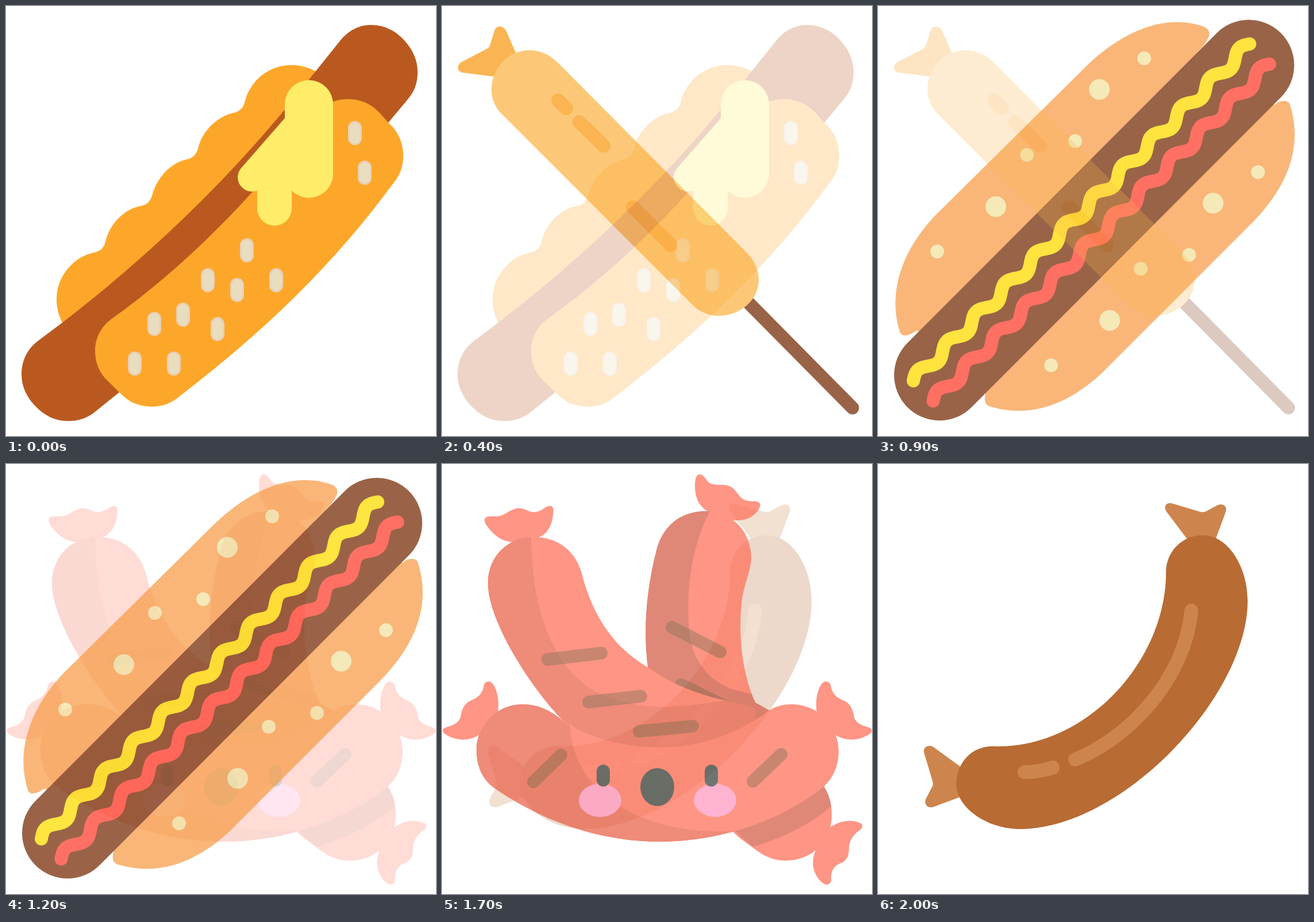
An HTML page for the animation above (2.2 s loop, 748x748 px).

```html
<!DOCTYPE html>
<html lang="en">
<head>
<meta charset="utf-8">
<title>Sausages</title>
<style>
html, body { margin: 0; width: 100%; height: 100%; overflow: hidden; background: #fff; }
svg { display: block; width: 100vw; height: 100vh; }
.line { fill: none; stroke-linecap: round; stroke-linejoin: round; }
</style>
</head>
<body>
<svg viewBox="0 0 748 748" xmlns="http://www.w3.org/2000/svg">
<defs>
  <path id="leftLink" d="M160 127C200 127 232 150 243 190C262 265 300 320 357 353C395 380 440 400 492 411L545 425V500H300L212 448C150 385 80 270 80 208C80 160 115 127 160 127Z"/>
  <path id="rightLink" d="M465 82C415 80 384 108 373 150C355 220 350 290 358 353V450H568V428L545 415C520 360 515 290 522 235C527 205 537 185 538 165C538 135 525 110 505 97Z"/>
  <path id="smile" d="M60 498C60 455 95 418 140 418C168 418 192 430 213 449C260 478 320 493 377 493C440 493 505 475 560 435C575 422 593 418 607 418C655 418 690 455 690 500C690 525 680 548 662 563C590 620 485 657 378 657C265 657 165 615 90 563C70 548 60 525 60 498Z"/>
  <path id="sideTie" d="M97 432C100 415 97 395 89 383C84 376 76 377 73 384C71 400 62 407 49 412C37 418 34 429 32 441C28 453 15 455 5 459C0 461 0 467 6 470C23 482 49 483 66 470Z"/>
  <clipPath id="leftClip"><use href="#leftLink"/></clipPath>
  <clipPath id="rightClip"><use href="#rightLink"/></clipPath>
  <clipPath id="smileClip"><use href="#smile"/></clipPath>
</defs>

<!-- curved sausage -->
<g class="scene">
  <g fill="#cd854d">
    <path d="M538 131L502 83C495 73 503 65 513 69L560 83C564 84 568 84 571 82L590 72C600 67 608 74 605 83L588 129Z"/>
    <path d="M144 527L96 492C87 487 78 493 80 502L95 552C96 556 96 559 94 562L84 581C79 590 85 599 95 597L141 580Z"/>
  </g>
  <path fill="#b86b33" d="M501 190C500 155 527 124 565 124C610 124 643 180 643 238C643 405 423 635 247 635C190 635 136 598 136 556C137 520 162 491 200 491C360 497 500 345 501 190Z"/>
  <path class="line" stroke="#cd854d" stroke-width="24" d="M545 255C535 370 440 475 343 514M255 536Q280 536 304 528"/>
</g>

<!-- smiling sausages -->
<g class="scene" fill="#ff725b">
  <path d="M128 136C108 136 95 128 84 115C78 108 74 103 74 97C75 90 84 91 92 91C108 92 112 82 130 77C145 76 148 83 160 84C175 82 176 76 186 73C196 72 194 82 193 90C190 112 180 126 160 130Z"/>
  <path d="M465 84C448 75 440 60 440 38C440 26 442 18 449 18C457 20 459 28 465 33C475 38 485 35 495 37C510 40 512 52 522 60C532 67 542 63 550 66C557 70 552 78 548 83C538 95 525 99 505 98Z"/>
  <use href="#sideTie"/>
  <use href="#sideTie" transform="matrix(-1 0 0 1 749 0)"/>
  <path d="M650 672C640 695 647 715 661 728C668 734 676 732 677 724C676 710 680 700 692 695C706 690 708 680 708 665C710 652 718 642 728 636C733 632 732 625 726 624C708 617 690 622 675 632Z"/>
  <path d="M660 555C675 575 678 595 678 612C678 655 645 690 597 690C570 690 550 675 538 665C520 653 510 645 500 632Z"/>
  <path fill="#d5604b" d="M500 630L540 666C590 652 635 630 677 596C675 580 669 566 660 555Z"/>
  <use href="#rightLink"/>
  <g clip-path="url(#rightClip)">
    <path fill="#d5604b" d="M467 80C430 150 425 230 430 290C438 350 465 375 505 392L545 402L575 430V460H340V80Z"/>
    <path class="line grill" d="M400 284L484 327M416 384L510 430"/>
  </g>
  <use href="#leftLink"/>
  <path clip-path="url(#leftClip)" fill="#e8654c" d="M155 120C155 250 190 340 250 385C290 415 360 425 400 422C440 420 490 412 545 402V520H60V120Z"/>
  <path class="line grill" d="M184 340L277 329M255 414L346 404M343 465L436 456"/>
  <use href="#smile"/>
  <path clip-path="url(#smileClip)" fill="#e8654c" d="M222 450C225 560 330 650 520 638V670H40V400H222Z"/>
  <path class="line grill" d="M159 553L207 506M541 552L590 505"/>
  <g fill="#ff9ac0">
    <ellipse cx="275" cy="585" rx="37" ry="29"/>
    <ellipse cx="475" cy="585" rx="37" ry="29"/>
  </g>
  <g fill="#3f4745">
    <rect x="269" y="523" width="23" height="38" rx="11.5"/>
    <rect x="457" y="523" width="23" height="38" rx="11.5"/>
    <ellipse cx="374.500" cy="562" rx="29.500" ry="33"/>
  </g>
</g>

<!-- hot dog with two sauces -->
<g class="scene">
  <g fill="#f79e4b">
    <path d="M66 565C58 571 51 573 46 573Q40 573 38 567C15 495 45 415 112 352L362 105C425 44 500 12 567 36C577 40 579 50 573 58Q570 66 556 80L564 84L80 568Z"/>
    <path d="M690 172C697 164 712 162 716 170C741 245 712 318 644 384L391 637C330 695 262 718 193 696C186 693 184 686 187 674L180 672L684 168Z"/>
  </g>
  <path class="line" stroke="#782f0a" stroke-width="158" d="M107 642L645 103"/>
  <g id="sauces" class="line" stroke-width="23"></g>
  <g id="dots" fill="#f1e2a0"></g>
</g>

<!-- battered prawn on a stick -->
<g class="scene">
  <path class="line" stroke="#782f0a" stroke-width="23" d="M520 503L714 699"/>
  <path fill="#fa9c19" d="M129 83L112 44C107 33 93 33 91 44L84 66C83 71 81 73 77 75L35 97C24 103 26 115 37 116L93 123Z"/>
  <path fill="#fbb64b" d="M104 188C93 177 86 162 86 146C86 108 115 77 152 77C170 77 187 84 200 97L531 430C544 444 551 459 551 476C551 512 518 539 481 539C464 539 447 532 434 518Z"/>
  <path class="line" stroke="#fa9c19" stroke-width="24" d="M202 164L216 178M239 202L281 243M332 350L398 416"/>
</g>

<!-- hot dog with mustard -->
<g class="scene">
  <path fill="#fda72a" d="M98 551C82 520 84 480 112 452C126 437 142 431 157 428Q170 424 173 410C180 380 205 352 238 347Q250 344 254 330C262 300 285 272 318 266Q330 262 334 248C342 215 370 190 400 185Q412 180 415 168C428 115 485 85 540 114L560 200L200 540Z"/>
  <path fill="#ba591f" d="M527 128L580 62C595 43 613 33 635 33C660 33 680 45 693 60C708 76 716 95 716 115C716 133 711 148 700 161L665 203L197 672L156 705C143 716 127 722 108 722C85 722 66 712 50 695C36 680 27 662 27 641C27 617 37 597 55 583L103 547C260 425 400 290 527 128Z"/>
  <path fill="#fda72a" d="M665 203C682 217 691 238 691 260C691 280 685 295 674 308C570 450 450 565 303 678C288 691 272 697 254 697C230 697 212 688 198 673L180 655C163 640 155 622 155 600C155 578 165 558 184 544C270 483 355 405 430 322C470 277 505 230 540 187C553 170 573 162 596 162C618 162 636 171 650 186Z"/>
  <path fill="#ffed69" d="M485 195V171A42 42 0 0 1 569 171V292A42 42 0 0 1 497 321V352A30 30 0 0 1 437 352V321A24.700 24.700 0 0 1 410 281Z"/>
  <g id="seeds" fill="#e9ddbf" stroke="#e8d0b8" stroke-width="3"></g>
</g>
</svg>
<script>
const NS = "http://www.w3.org/2000/svg";

function add(parent, tag, attrs) {
  const el = document.createElementNS(NS, tag);
  for (const k in attrs) el.setAttribute(k, attrs[k]);
  document.getElementById(parent).append(el);
}

for (const el of document.querySelectorAll(".grill")) {
  el.setAttribute("stroke", "#6e4b2b");
  el.setAttribute("stroke-opacity", 0.5);
  el.setAttribute("stroke-width", 22);
}

// A sine wave laid along the 45 degree diagonal.
function wave(x0, y0) {
  const turns = 11.5, steps = 300, amp = 5.5;
  const pts = [];
  for (let i = 0; i <= steps; i++) {
    const u = i / steps;
    const off = amp * Math.sin(u * turns * 2 * Math.PI);
    pts.push((x0 + 585 * u - off).toFixed(1) + " " + (y0 - 586 * u - off).toFixed(1));
  }
  return "M" + pts.join("L");
}
add("sauces", "path", { d: wave(61.5, 652), stroke: "#ffdc00" });
add("sauces", "path", { d: wave(96, 687), stroke: "#ff4130" });

const dots = [[103, 427, 12], [205, 349, 18], [259, 259, 12], [343, 235, 12], [385, 145, 18], [463, 91, 12]];
for (const [x, y, r] of dots)
  for (const d of [0, 198]) add("dots", "circle", { cx: x + d, cy: y + d, r });

const seeds = [[607, 221], [624, 290], [419, 425], [351, 477], [402, 494], [470, 477],
  [308, 537], [258, 553], [368, 562], [224, 622], [292, 622]];
for (const [x, y] of seeds)
  add("seeds", "rect", { x: x - 10.5, y: y - 19.5, width: 21, height: 39, rx: 10.5 });

// Scenes are stacked last to first, so the outgoing one lies on top.
const scenes = [...document.querySelectorAll(".scene")].reverse();
const LOOP = 2200, SLOT = 500, HOLD = 200, STEP = 100;

function draw(now) {
  const t = now % LOOP;
  const cur = Math.floor(t / SLOT);
  const local = t - cur * SLOT;
  const mix = local < HOLD ? 0 : (Math.floor((local - HOLD) / STEP) + 1) / 4;
  scenes.forEach((el, i) => {
    const alpha = i === cur ? 1 - mix : i === cur + 1 ? mix : 0;
    el.setAttribute("opacity", alpha);
    el.style.display = alpha ? "" : "none";
  });
}

const start = performance.now();
function tick() {
  draw(performance.now() - start);
  requestAnimationFrame(tick);
}
tick();
</script>
</body>
</html>
```
